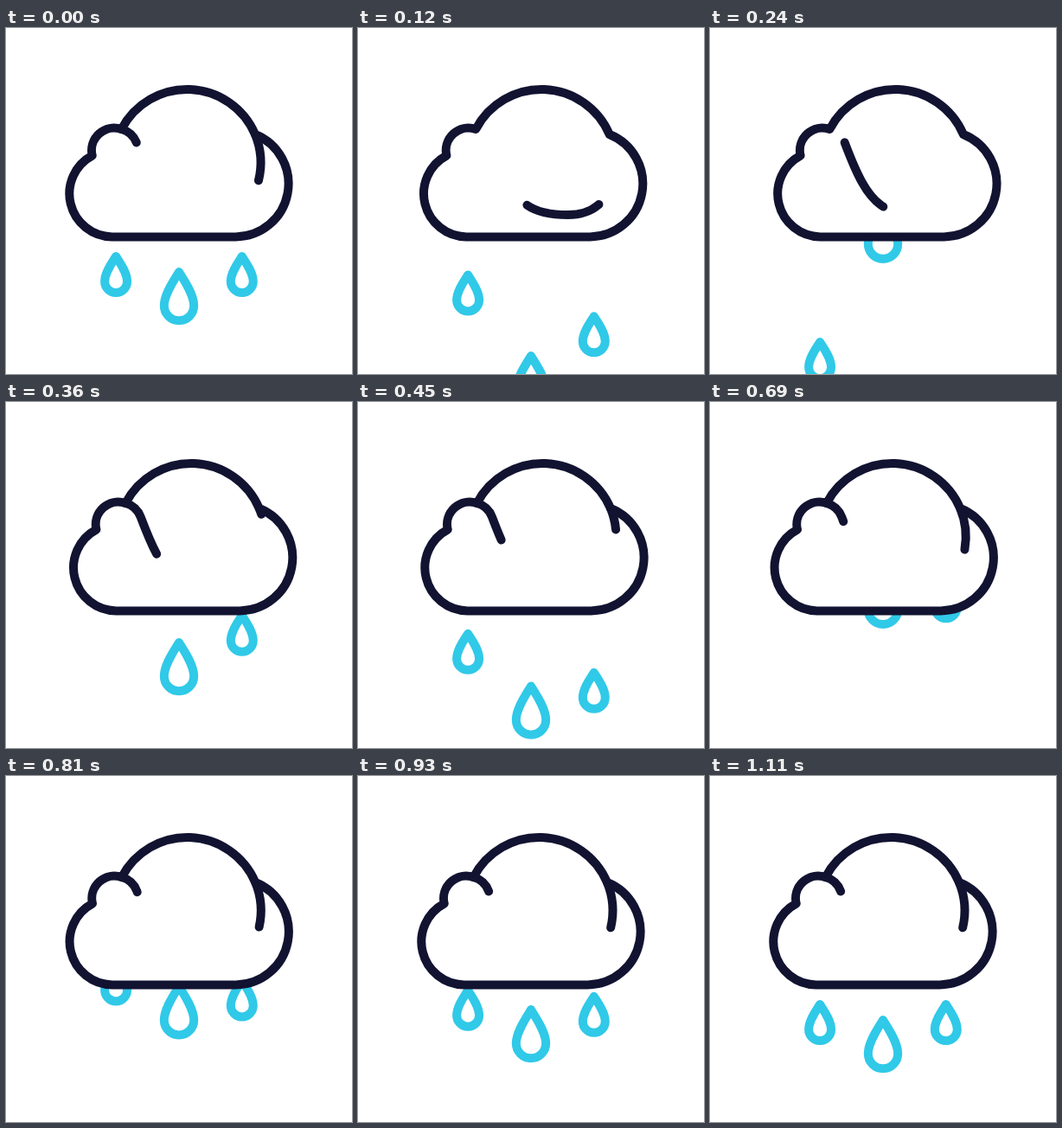
An HTML page for the animation above (1140 ms loop, 400 px wide and 400 px high).

```html
<!DOCTYPE html>
<html lang="en">
<head>
<meta charset="utf-8">
<title>Rain cloud</title>
<style>
  @property --x { syntax: "<length>"; inherits: false; initial-value: 0px; }
  @property --y { syntax: "<length>"; inherits: false; initial-value: 0px; }

  html, body { margin: 0; width: 100%; height: 100%; overflow: hidden; background: #fff; }
  svg { display: block; width: 100%; height: 100%; }
  path { fill: none; stroke-width: 10; stroke-linecap: round; stroke-linejoin: round; }

  .cloud, .fold, .drop { animation: 1140ms linear infinite; }
  .cloud { stroke: #121331; transform: translateX(var(--x)); animation-name: sway; }
  .cloud .body { fill: #fff; }
  .fold { stroke-dasharray: 88 205; animation-name: roll; }
  .drop { stroke: #30c9e8; transform: translateY(var(--y)); }
  .left { animation-name: fall-left; }
  .middle { animation-name: fall-middle; }
  .right { animation-name: fall-right; }

  @keyframes sway {
    0% { --x: 0px; animation-timing-function: cubic-bezier(.33, .2, .6, 1); }
    23.68% { --x: 5px; animation-timing-function: cubic-bezier(.333, 0, .667, 1); }
    78.95%, 100% { --x: 0px; }
  }

  /* One full dash period per loop */
  @keyframes roll {
    0% { stroke-dashoffset: 34.7px; animation-timing-function: cubic-bezier(.333, .41, .667, .818); }
    21.05% { stroke-dashoffset: -171px; animation-timing-function: cubic-bezier(.333, .667, .667, .855); }
    50% { stroke-dashoffset: -244.5px; animation-timing-function: cubic-bezier(.333, .77, .667, 1); }
    78.95%, 100% { stroke-dashoffset: -258.3px; }
  }

  /* Each drop falls away, passes once at full speed, then settles */
  @keyframes fall-left {
    0%, 1.46% { --y: 0px; animation-timing-function: cubic-bezier(.333, 0, .667, .333); }
    25.26% { --y: 145px; }
    25.27%, 29.12% { --y: -90px; }
    55.26% { --y: 145px; }
    55.27% { --y: -90px; }
    60.53% { --y: -90px; animation-timing-function: cubic-bezier(.333, .667, .667, 1); }
    97.37%, 100% { --y: 0px; }
  }
  @keyframes fall-middle {
    0% { --y: 0px; animation-timing-function: cubic-bezier(.333, 0, .667, .333); }
    12.28% { --y: 130px; }
    12.29%, 15.09% { --y: -110px; }
    52.63% { --y: 130px; }
    52.64% { --y: -110px; }
    55% { --y: -110px; animation-timing-function: cubic-bezier(.333, .667, .667, 1); }
    94.74%, 100% { --y: 0px; }
  }
  @keyframes fall-right {
    0% { --y: 0px; animation-timing-function: cubic-bezier(.333, 0, .667, .333); }
    15.35% { --y: 145px; }
    15.36%, 22.98% { --y: -90px; }
    51.05% { --y: 145px; }
    51.06% { --y: -90px; animation-timing-function: cubic-bezier(.333, .667, .667, 1); }
    96.05%, 100% { --y: 0px; }
  }
</style>
</head>
<body>
<svg viewBox="0 0 400 400">
  <defs>
    <path id="small" d="M0 264C-5 272-13 283-13 293a13 13 0 0 0 26 0C13 283 5 272 0 264Z"/>
  </defs>
  <g class="drop left"><use href="#small" x="127.1"/></g>
  <g class="drop middle">
    <path d="M200 282C194 292 182.8 308 182.8 321a17.2 17.2 0 0 0 34.4 0C217.2 308 206 292 200 282Z"/>
  </g>
  <g class="drop right"><use href="#small" x="272.8"/></g>
  <g class="cloud">
    <path class="body" d="M99.7 147.5A49.9 49.9 0 0 0 122.5 241.4H265.5A61.4 61.4 0 0 0 288 123
      A85.5 85.5 0 0 0 133.5 117A26 26 0 0 0 99.7 147.5Z"/>
    <path class="fold" d="M288 123A85.5 85.5 0 0 1 292 176C288 188 283 198 274.5 205
      C265 213 254 216 240 216C222 216 206 214 193 205C176 193 165 170 151 133
      A26 26 0 0 0 133.5 117"/>
  </g>
</svg>
</body>
</html>
```
